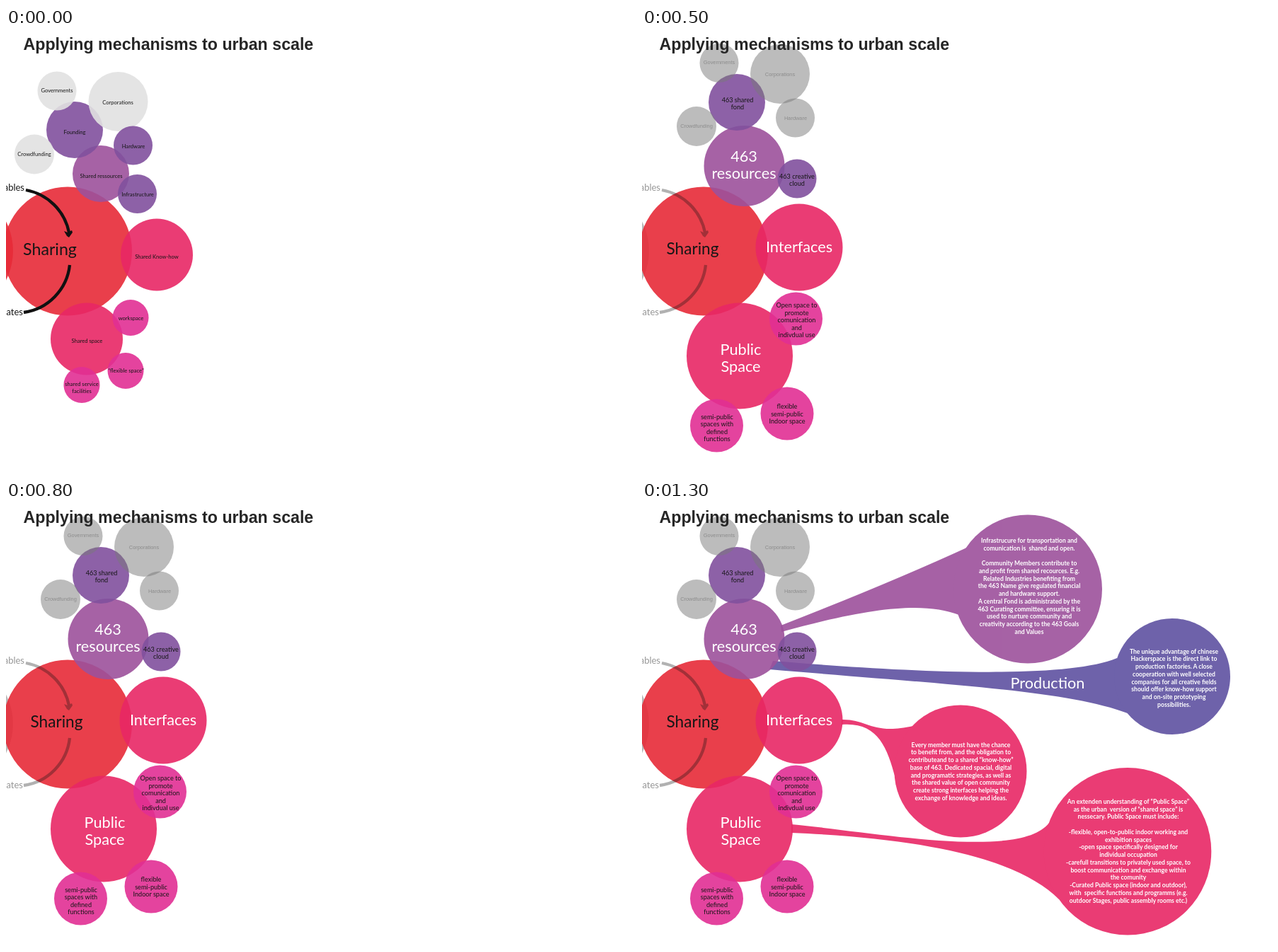
An HTML page for the animation above (1500 ms loop, 890 by 629 pixels).

```html
<!DOCTYPE html>
<html lang="en">
<head>
<meta charset="utf-8">
<title>Applying mechanisms to urban scale</title>
<style>
html, body { margin: 0; height: 100%; overflow: hidden; background: #fff; }
svg { display: block; font-family: Lato, "Noto Sans", sans-serif; }
text { text-anchor: middle; white-space: pre; }
.title { font: bold 23.2px "Liberation Sans", Arial, sans-serif; text-anchor: start; }
.faded { font-family: "Liberation Sans", Arial, sans-serif; }
.arrow { fill: none; stroke: #111; stroke-width: 4.3; }
</style>
</head>
<body>
<svg id="stage" width="890" height="629" viewBox="0 0 890 629"></svg>
<script>
const RED = '#e72b38', PINK = '#e82765', MAGENTA = '#e22f94', MAUVE = '#9d519c',
      PURPLE = '#81509e', BLUE = '#5f52a1', PALE = '#e1e1e1', INK = '#161616';

const circle = (x, y, r, fill, alpha = 0.9) =>
  `<circle cx="${x}" cy="${y}" r="${r}" fill="${fill}" opacity="${alpha}"/>`;
const shade = (x, y, r) => circle(x, y, r, '#7a7a7a', 0.5);

// Lines are split at "|" and centred as a block on (x, y).
function label(x, y, words, size = 7.6, fill = INK, leading = size * 1.14, extra = '') {
  const lines = words.split('|');
  const top = y - (lines.length - 1) * leading / 2 + size * 0.33;
  return lines.map((line, i) =>
    `<text x="${x}" y="${top + i * leading}" font-size="${size}" fill="${fill}" ${extra}>${line}</text>`).join('');
}
const big = (x, y, words) => label(x, y, words, 21.7, '#fff', 23.5);
const note = (x, y, words) => label(x, y, words, 9.1, INK, 10.5);
const faded = (x, y, word) => label(x, y, word, 7.4, '#8c8c8c', 8, 'class="faded"');
const story = (x, y, words) => label(x, y, words, 8.6, '#fff', 10.75, 'font-weight="bold"');

// A bubble and the tail that ties it to its topic.
const balloon = (x, y, r, fill, tail) =>
  `<g fill="${fill}" opacity=".9"><path d="${tail}"/><circle cx="${x}" cy="${y}" r="${r}"/></g>`;

const cycle = (arrowAlpha, textAlpha) => `<g opacity="${arrowAlpha}">
  <path class="arrow" d="M28 229A76 76 0 0 1 89 289"/>
  <path d="M82 287L87 289 93 286 94 289 89 296 86 294Z" fill="#111"/>
  <path class="arrow" d="M90 335A76 76 0 0 1 25 402"/></g>
  <g opacity="${textAlpha}" font-size="13" fill="${INK}">
  <text x="26" y="229.5" style="text-anchor:end">enables</text>
  <text x="24" y="405.5" style="text-anchor:end">creates</text></g>`;

const title = '<text class="title" x="24.5" y="31" fill="#262626">Applying mechanisms to urban scale</text>';

const sharing = circle(87, 315.5, 91, RED);

const overview =
  circle(-81, 315, 91, RED) + sharing +
  circle(134, 206, 40, MAUVE) + circle(213, 320.5, 51, PINK) + circle(114, 439.5, 51, PINK) +
  circle(97, 144, 40, PURPLE) + circle(185.5, 234.5, 27.5, PURPLE) +
  circle(176, 409.5, 25.5, MAGENTA) + circle(169, 484.5, 25.5, MAGENTA) + circle(107, 504.5, 25.5, MAGENTA) +
  circle(72, 89, 27.5, PALE) + circle(158.5, 104, 42, PALE) + circle(40, 178.5, 28, PALE) +
  circle(179.5, 166, 27.5, PURPLE) +
  cycle(1, 1) + label(62, 313, 'Sharing', 23.2) +
  label(72, 88, 'Governments') + label(158, 105, 'Corporations') + label(97, 147, 'Founding') +
  label(180, 167, 'Hardware') + label(40, 178, 'Crowdfunding') + label(134.5, 209, 'Shared ressources') +
  label(186, 235, 'Infrastructure') + label(213, 323, 'Shared Know-how') + label(114.5, 442, 'Shared space') +
  label(176.5, 410, 'workspace') + label(169.5, 484, '“flexible space”') +
  label(107, 508, 'shared service|facilities', 7.6, INK, 10);

const district =
  shade(-81, 315, 91) + sharing +
  circle(144.5, 195, 57, MAUVE) + circle(222, 310, 61.5, PINK) + circle(138, 463.5, 75, PINK) +
  circle(134, 105, 40, PURPLE) + circle(219, 213, 27.5, PURPLE) +
  circle(217.5, 411, 37.5, MAGENTA) + circle(205, 545, 37.5, MAGENTA) + circle(105.5, 562, 37.5, MAGENTA) +
  shade(109, 49.5, 27.5) + shade(195, 65, 42) + shade(77, 139, 28) + shade(216.5, 127, 27.5) +
  cycle(0.32, 0.45) + label(71.5, 313, 'Sharing', 22.6) +
  faded(109, 49, 'Governments') + faded(195, 66, 'Corporations') +
  faded(77, 139, 'Crowdfunding') + faded(217, 127.5, 'Hardware') +
  note(135, 107, '463 shared|fond') + note(219, 215, '463 creative|cloud') +
  big(144, 194, '463|resources') + big(222, 309.5, 'Interfaces') + big(139.5, 467, 'Public|Space') +
  note(218.5, 413, 'Open space to|promote|comunication|and|indivdual use') +
  note(205, 545.5, 'flexible|semi-public|Indoor space') +
  note(106, 565.5, 'semi-public|spaces with|defined|functions');

const balloons =
  balloon(545, 124.5, 105, MAUVE, 'M196 176Q350 116 463 64L448 161C400 143 330 148 197 185Z') +
  balloon(749, 248, 82, BLUE, 'M185 226C330 238 590 256 671 222L686 300C600 268 440 260 180 238Z') +
  balloon(450, 382, 93.5, PINK, 'M282 309C318 308 325 331 383 318L358 392C346 346 332 312 282 316Z') +
  balloon(686, 495.3, 118.3, PINK, 'M211 457C330 468 535 508 575 455L589 563C540 514 430 478 211 469Z');

const stories =
  big(573, 258, 'Production') +
  story(547, 120.5, 'Infrastrucure for transportation and|comunication is  shared and open.||' +
    'Community Members contribute to|and profit from shared recources. E.g.|Related Industries benefiting from|' +
    'the 463 Name give regulated financial|and hardware support.|A central Fond is administrated by the|' +
    '463 Curating committee, ensuring it is|used to nurture community and|' +
    'creativity according to the 463 Goals|and Values') +
  story(751.5, 250.5, 'The unique advantage of chinese|Hackerspace is the direct link to|' +
    'production factories. A close|cooperation with well selected|companies for all creative fields|' +
    'should offer know-how support|and on-site prototyping|possibilities.') +
  story(450.5, 382.5, 'Every member must have the chance|to benefit from, and the obligation to|' +
    'contributeand to a shared “know-how”|base of 463. Dedicated spacial, digital|' +
    'and programatic strategies, as well as|the shared value of open community|' +
    'create strong interfaces helping the|exchange of knowledge and ideas.') +
  story(687, 495, 'An extenden understanding of “Public Space”|as the urban  version of “shared space” is|' +
    'nessecary. Public Space must include:||-flexible, open-to-public indoor working and|exhibition spaces|' +
    '-open space specifically designed for|individual occupation|-carefull transitions to privately used space, to|' +
    'boost communication and exchange within|the comunity|-Curated Public space (indoor and outdoor),|' +
    'with  specific functions and programms (e.g.|outdoor Stages, public assembly rooms etc.)');

const stage = document.getElementById('stage');
const scenes = [overview, district, balloons + district + stories];
stage.innerHTML = scenes.map(scene => `<g>${scene}${title}</g>`).join('');

function draw() {
  const current = Math.floor(performance.now() / 500) % scenes.length;
  [...stage.children].forEach((scene, i) => { scene.style.display = i === current ? '' : 'none'; });
  requestAnimationFrame(draw);
}
draw();
</script>
</body>
</html>
```
